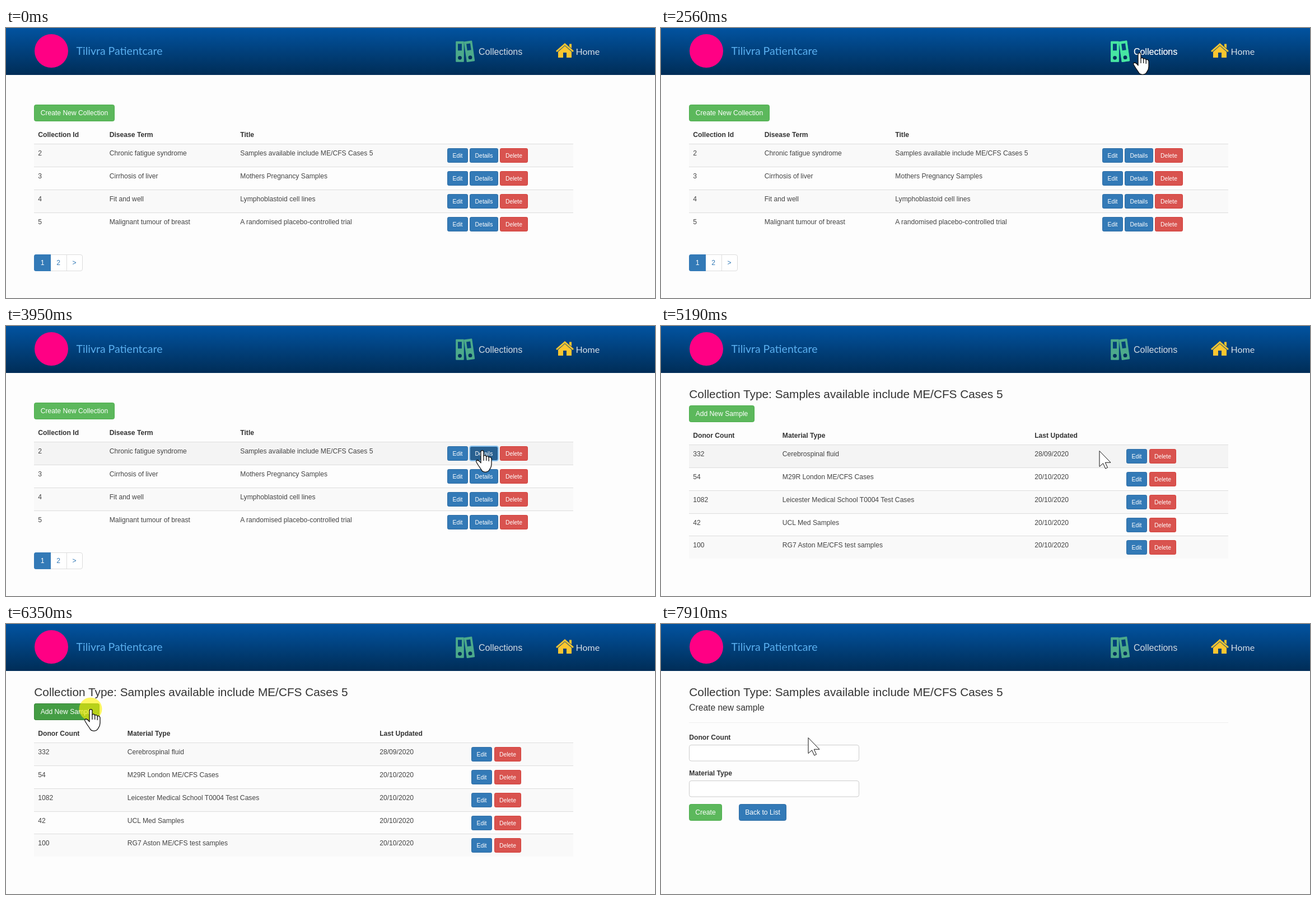
Write an HTML page that moves like this. It is 1159 px wide and 483 px high and loops after 7990 ms.

```html
<!DOCTYPE html>
<html lang="en">
<head>
<meta charset="utf-8">
<title>Sample collections</title>
<style>
html, body { margin: 0; width: 100%; height: 100%; overflow: hidden; background: #fdfdfd; }
svg { display: block; width: 1159px; height: 483px; font-family: "Liberation Sans", Arial, sans-serif; }
.cell { font-size: 12.13px; fill: #444; }
.head { font-size: 12.13px; font-weight: bold; fill: #333; }
.btn { font-size: 12.13px; fill: #fff; text-anchor: middle; }
.small { font-size: 10.4px; fill: #fff; text-anchor: middle; }
.h3 { font-size: 20.8px; fill: #333; }
.h4 { font-size: 15.6px; fill: #333; }
.brand { font: 400 19.5px Lato, sans-serif; fill: #5bb0f0; }
.home { font: 400 16px Lato, sans-serif; fill: #d8e0e8; }
.link { font-size: 16px; }
.page { font-size: 12.13px; text-anchor: middle; fill: #337ab7; }
</style>
</head>
<body>
<svg id="stage" viewBox="0 0 1159 483" xmlns="http://www.w3.org/2000/svg"></svg>
<script>
const LOOP = 7990, STEP = 77;
const PITCH = 40.75;
const BLUE = ['#337ab7', '#2e6da4'], DARK = ['#286090', '#204d74'];
const GREEN = ['#5cb85c', '#4cae4c'], DEEP = ['#449d44', '#398439'];
const RED = ['#d9534f', '#d43f3a'];

const text = (cls, x, y, s) => `<text class="${cls}" x="${x}" y="${y}">${s}</text>`;
const rect = (x, y, w, h, fill, more = '') =>
  `<rect x="${x}" y="${y}" width="${w}" height="${h}" fill="${fill}" ${more}/>`;
const group = (id, body) => `<g id="${id}">${body}</g>`;

function button(x, y, w, label, [fill, edge], cls = 'small') {
  const big = cls === 'btn';
  const h = big ? 30 : 26;
  return rect(x + .5, y + .5, w - 1, h - 1, fill, `stroke="${edge}" rx="${big ? 3 : 2.2}"`) +
    text(cls, x + w / 2, y + (big ? 19 : 16.5), label);
}

// Rows of text with action buttons at the end of each one
function table(top, cols, heads, rows, actions, hoverId) {
  const edge = k => Math.round(top + .45 + k * PITCH);
  let out = heads.map((s, i) => text('head', cols[i], top - 12, s)).join('');
  rows.forEach((row, k) => {
    const y = edge(k), h = edge(k + 1) - y;
    if (k % 2 === 0) out += rect(50, y, 963, h, '#f9f9f9');
    if (k === 0) out += group(hoverId, rect(50, y, 963, h, '#f4f4f4'));
    out += rect(50, y, 963, 1, '#ddd');
    out += row.map((s, i) => text('cell', cols[i], y + 21, s)).join('');
    out += actions.map(([x, w, s, c]) => button(x, y + 8, w, s, c)).join('');
  });
  return out;
}

function binders(color, ink) {
  const one = rect(-7.3, -18.5, 14.6, 37, color, 'rx="1"') +
    rect(-3.5, -14, 7, 12, '#034078') + '<circle cy="11" r="3.4" fill="#02315d"/>';
  return `<g transform="translate(810.5 42.3)">${one}</g>` +
    `<g transform="translate(827.5 41.8) rotate(-8)">${one}</g>` +
    `<text class="link" x="844" y="48" fill="${ink}">Collections</text>`;
}

const header = rect(0, 0, 1159, 84, 'url(#bar)') +
  '<circle cx="81" cy="41" r="30" fill="#ff0084"/>' +
  text('brand', 125.5, 48, 'Tilivra Patientcare') +
  binders('#4caa8b', '#d5dce3') +
  group('nav', rect(803, 22, 120, 40, 'url(#bar)', 'opacity="0"') + binders('#46e5a2', '#f0f4f8')) +
  '<path d="M982 41 998 27 1014 41 1012 43 998 31 984 43Z" fill="#fcc630"/>' +
  '<path d="M1006 28.500h4v8l-4-3.500zM986 42.500 998 32 1010 42.500V53H1001V44H995V53H986Z" fill="#fcc630"/>' +
  text('home', 1017.5, 48, 'Home');

const list = button(50, 137, 144, 'Create New Collection', GREEN, 'btn') +
  table(207, [57.3, 184.7, 418.3], ['Collection Id', 'Disease Term', 'Title'], [
    ['2', 'Chronic fatigue syndrome', 'Samples available include ME/CFS Cases 5'],
    ['3', 'Cirrhosis of liver', 'Mothers Pregnancy Samples'],
    ['4', 'Fit and well', 'Lymphoblastoid cell lines'],
    ['5', 'Malignant tumour of breast', 'A randomised placebo-controlled trial']
  ], [[788, 37, 'Edit', BLUE], [828, 51, 'Details', BLUE], [882, 50, 'Delete', RED]], 'rowA') +
  group('edit', button(788, 215, 37, 'Edit', DARK)) +
  group('details', button(828, 215, 51, 'Details', DARK)) +
  rect(50.5, 405.5, 86, 29, '#fff', 'stroke="#ddd" rx="3.5"') + rect(108, 405, 1, 30, '#ddd') +
  '<path d="M80 405H53.5Q50 405 50 408.5V431.5Q50 435 53.5 435H80Z" fill="#337ab7"/>' +
  '<text class="page" x="65" y="424" style="fill:#fff">1</text>' +
  text('page', 93.5, 424, '2') + text('page', 122, 424, '&gt;');

const title = text('h3', 50.3, 129, 'Collection Type: Samples available include ME/CFS Cases 5');
const samples = title + button(50, 142, 117, 'Add New Sample', GREEN, 'btn') +
  group('add', button(50, 142, 117, 'Add New Sample', DEEP, 'btn')) +
  table(212, [57.3, 216.8, 667.2], ['Donor Count', 'Material Type', 'Last Updated'], [
    ['332', 'Cerebrospinal fluid', '28/09/2020'],
    ['54', 'M29R London ME/CFS Cases', '20/10/2020'],
    ['1082', 'Leicester Medical School T0004 Test Cases', '20/10/2020'],
    ['42', 'UCL Med Samples', '20/10/2020'],
    ['100', 'RG7 Aston ME/CFS test samples', '20/10/2020']
  ], [[831, 37, 'Edit', BLUE], [872, 48, 'Delete', RED]], 'rowB');

const field = (y, label) => text('head', 50.3, y - 9, label) +
  rect(50.5, y + .5, 303, 28.5, '#fff', 'stroke="#ccc" rx="3.5"');
const form = title + text('h4', 50.3, 155, 'Create new sample') + rect(50, 176, 963, 1, '#eee') +
  field(216, 'Donor Count') + field(280, 'Material Type') +
  button(50, 322, 59, 'Create', GREEN, 'btn') + button(139, 322, 85, 'Back to List', BLUE, 'btn');

// Each pointer is drawn around its hot spot
const pointers =
  group('arrow', '<path d="M0 .5V28.500L6.500 22.700 10.700 32 14.500 30.300 10.300 21.200H20Z" fill="#fff" stroke="#111"/>') +
  group('hand', '<g transform="translate(-11 0)" stroke="#111" stroke-width="1.300" stroke-linejoin="round">' +
    '<path d="M9 3Q9 .7 11.500 .7T14 3V10.500Q16.500 7.500 18.700 11.500 21.200 9 23.200 13 26.500 11 28 15.500V25Q28 30 25 34 22.500 39.300 17 39.300T9.500 34.500L5 28 1 21.500Q0 18 3 18 6 18.500 9 23Z" fill="#fff"/>' +
    '<path d="M14 10V19M18.700 11.500V19M23.200 13V20" fill="none"/></g>') +
  group('beam', '<path d="M-7 -13.500H-2L0 -12 2 -13.500H7M-7 13.500H-2L0 12 2 13.500H7M0 -12V12" fill="none" stroke="#111" stroke-width="1.800"/>');

document.getElementById('stage').innerHTML =
  '<defs><linearGradient id="bar" x2="0" y2="1"><stop stop-color="#0253a0"/><stop offset="1" stop-color="#002d57"/></linearGradient></defs>' +
  rect(0, 0, 1159, 483, '#fdfdfd') + header +
  group('list', list) + group('samples', samples) + group('form', form) +
  '<rect id="ring" rx="3.500" fill="none" stroke="#8cc4f0" stroke-width="2"/>' +
  '<circle id="halo" r="20.500" fill="#fff200"/>' + group('cursor', pointers);

// Page loads; a reload drops the hover until the pointer moves again
const loads = [[0, 'list'], [1780, 'list'], [4180, 'samples'], [7300, 'form']];

// Glides: first step, last step, where the pointer comes to rest
const glides = [
  [360, 520, 978, 226], [840, 1000, 859, 54], [1230, 1390, 856, 37],
  [2560, 3110, 814, 225], [3250, 3570, 850, 222], [5190, 5190, 783, 223],
  [5265, 5340, 451, 179], [5670, 6280, 151, 152], [7360, 7530, 157, 153],
  [7680, 7910, 263, 203]
];
const ENTRY = [1073, 474];

const clicks = [[1460, 1630], [3720, 3950], [6350, 6670]];

// Areas that react to the pointer, with the pointer shown over them
const areas = [
  { id: 'nav', page: 'list', box: [803, 22, 120, 40], kind: 'hand' },
  { id: 'edit', page: 'list', box: [788, 215, 37, 26], kind: 'hand', ring: true },
  { id: 'details', page: 'list', box: [828, 215, 51, 26], kind: 'hand', ring: true },
  { id: 'rowA', page: 'list', box: [50, 208, 963, 40] },
  { id: 'add', page: 'samples', box: [50, 142, 117, 30], kind: 'hand', ring: true },
  { id: 'rowB', page: 'samples', box: [50, 213, 963, 40] },
  { id: 'text', page: 'form', box: [50, 141, 135, 27], kind: 'beam' }
];

const get = id => document.getElementById(id);
const show = (id, on) => { const el = get(id); if (el) el.style.display = on ? '' : 'none'; };
const set = (id, attrs) => Object.entries(attrs).forEach(([k, v]) => get(id).setAttribute(k, v));
const ease = p => (1 - Math.cos(Math.PI * p)) / 2;
const loadAt = t => loads.findLast(([at]) => at <= t);

function pointerAt(t) {
  let [x, y] = ENTRY, moved = 0;
  for (const [from, to, toX, toY] of glides) {
    if (t < from) break;
    const steps = Math.round((to - from) / STEP);
    const gap = (to - from) / steps || STEP;
    const i = Math.min(steps, Math.floor((t - from + .5) / gap));
    const p = ease((i + 1) / (steps + 1));
    x += (toX - x) * p;
    y += (toY - y) * p;
    moved = from + i * gap;
  }
  return { x, y, moved };
}

function draw(t) {
  const [loaded, page] = loadAt(t);
  const { x, y, moved } = pointerAt(t);
  const seen = loadAt(moved)[1];
  const hits = areas.filter(({ page, box: [l, top, w, h] }) =>
    page === seen && x >= l && x <= l + w && y >= top && y <= top + h);
  const kind = hits.find(a => a.kind)?.kind ?? 'arrow';
  const fresh = moved >= loaded;

  ['list', 'samples', 'form'].forEach(id => show(id, id === page));
  ['arrow', 'hand', 'beam'].forEach(id => show(id, id === kind));
  areas.forEach(a => show(a.id, fresh && hits.includes(a)));
  show('cursor', t >= glides[0][0]);
  set('cursor', { transform: `translate(${Math.round(x)} ${Math.round(y)})` });

  const click = clicks.find(([from, to]) => t >= from && t < to);
  show('halo', click);
  if (click) {
    const p = (t - click[0]) / (click[1] - click[0]);
    set('halo', { cx: x, cy: y, opacity: .62 * Math.min(1, 2 - 2 * p) });
  }

  const focus = fresh && hits.find(a => a.ring);
  const pressed = clicks.some(([, to]) => to - STEP > moved && t >= to - STEP);
  show('ring', focus && pressed);
  if (focus) {
    const [l, top, w, h] = focus.box;
    set('ring', { x: l, y: top, width: w, height: h });
  }
}

let start;
function tick(now) {
  start ??= now;
  draw(Math.max(0, now - start) % LOOP);
  requestAnimationFrame(tick);
}
draw(0);
requestAnimationFrame(tick);
</script>
</body>
</html>
```
